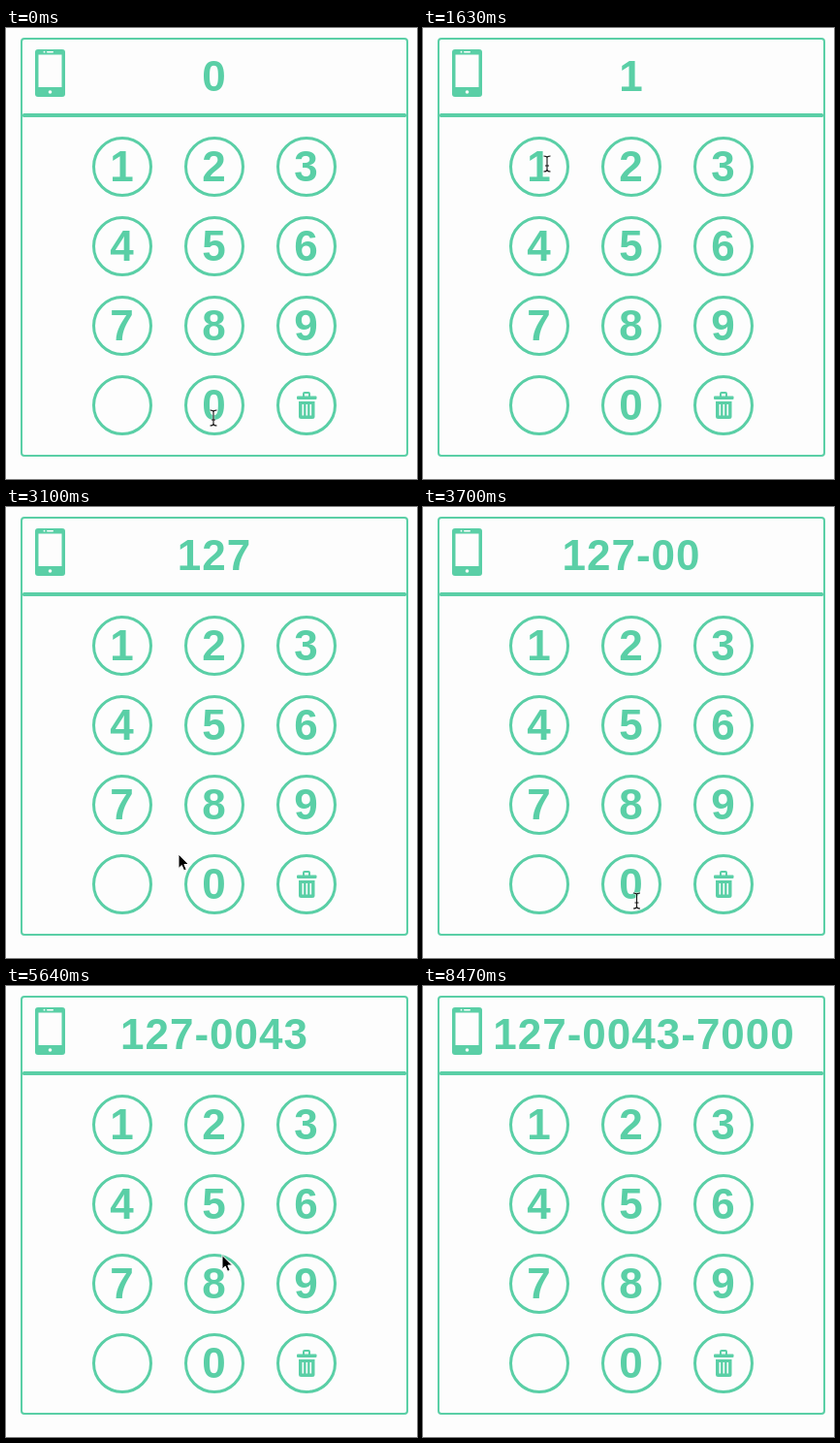
These frames come from a looping animation (424 by 465 pixels, 9.05 s). An HTML page:

```html
<!DOCTYPE html>
<html lang="en">
<head>
<meta charset="utf-8">
<title>Phone keypad</title>
<style>
  html, body { margin: 0; width: 100%; height: 100%; overflow: hidden; background: #fdfdfd; }
  svg { display: block; width: 424px; height: 465px; }
  text {
    font: bold 44px "Liberation Sans", Arial, sans-serif;
    letter-spacing: 1px;
    fill: #5acfa6;
    text-anchor: middle;
  }
  #number.full { text-anchor: start; }
  #number.hint { fill: #e0f4ed; }
  .ink { fill: #5acfa6; }
  .line { fill: none; stroke: #5acfa6; }
  .paper { fill: #fdfdfd; }
</style>
</head>
<body>
<svg viewBox="0 0 424 465">
  <rect class="line" x="16" y="11" width="398" height="430" rx="3" stroke-width="2"/>
  <rect class="ink" x="17" y="88" width="396" height="4" rx="1.5"/>

  <g id="phone">
    <rect class="ink" x="30" y="22" width="31" height="49" rx="3"/>
    <rect class="paper" x="33.5" y="27.5" width="24" height="33.5"/>
    <rect class="paper" x="42" y="24" width="7" height="1.5" rx=".7"/>
    <circle class="paper" cx="39.5" cy="24.7" r=".9"/>
    <circle class="paper" cx="45.5" cy="66" r="1.8"/>
  </g>

  <text id="number" y="64.5"></text>
  <g id="keys"></g>

  <g id="trash">
    <path class="line" d="M307 380v-3q0-1 1-1h4q1 0 1 1v3" stroke-width="2"/>
    <rect class="ink" x="300" y="379.5" width="20.5" height="3.5" rx="1"/>
    <path class="ink" d="M302 385h16.500v15.500q0 2.500-2.500 2.500h-11.500q-2.500 0-2.500-2.500z"/>
    <path d="M306.300 388v11.500M310.300 388v11.500M314.300 388v11.500" stroke="#fdfdfd" stroke-width="1.6"/>
  </g>

  <g id="beam" fill="none">
    <path d="M-3.500-8Q0-8 0-6V6Q0 8-3.500 8M3.500-8Q0-8 0-6M0 6Q0 8 3.500 8M-2 2H2" stroke="#fff" stroke-width="2.4" opacity=".7"/>
    <path d="M-3.500-8Q0-8 0-6V6Q0 8-3.500 8M3.500-8Q0-8 0-6M0 6Q0 8 3.500 8M-2 2H2" stroke="#111" stroke-width="1.1"/>
  </g>
  <path id="arrow" d="M0 0V14.500L3.300 11.500L5.600 16.800L8.200 15.700L5.900 10.500H10.500Z" fill="#000" stroke="#fff" stroke-width="1"/>
</svg>

<script>
const LOOP = 9050;
const HINT = "000-0000-0000";

// [time, shown text]
const typed = [
  [0, "0"], [440, HINT], [1480, "1"], [2220, "12"], [2810, "127"],
  [3550, "127-0"], [3700, "127-00"], [4600, "127-004"], [5040, "127-0043"],
  [6090, "127-0043-7"], [6540, "127-0043-70"],
  [6980, "127-0043-700"], [7130, "127-0043-7000"]
];

// [time, pointer shape, x, y]
const moves = [
  [0, "beam", 214, 402],
  [150, "arrow", 262, 399],
  [290, "arrow", 307, 395],
  [740, "arrow", 290, 360],
  [890, "arrow", 228, 262],
  [1040, "arrow", 160, 168],
  [1190, "beam", 125.5, 134],
  [1330, "beam", 128, 140],
  [1780, "beam", 136, 141],
  [1920, "arrow", 177, 142],
  [2070, "beam", 220, 143],
  [2360, "beam", 203.5, 292],
  [2510, "arrow", 155, 300],
  [2660, "beam", 136, 306],
  [3100, "arrow", 178, 358],
  [3250, "beam", 220.5, 406],
  [4150, "arrow", 192, 345],
  [4300, "arrow", 150, 258],
  [4450, "beam", 130, 230],
  [4740, "arrow", 245, 176],
  [4890, "beam", 325, 142],
  [5340, "arrow", 337, 140],
  [5640, "arrow", 223, 277.5],
  [5790, "arrow", 160, 296],
  [5940, "beam", 130, 308],
  [6390, "beam", 219.5, 405],
  [8320, "arrow", 355, 449],
  [8470, "none", 0, 0]
];

const $ = id => document.getElementById(id);
const number = $("number");

function add(tag, attrs, label = "") {
  const el = document.createElementNS("http://www.w3.org/2000/svg", tag);
  for (const k in attrs) el.setAttribute(k, attrs[k]);
  el.textContent = label;
  $("keys").append(el);
}

[..."123456789 0 "].forEach((label, i) => {
  const x = 120 + (i % 3) * 95;
  const y = 143 + Math.floor(i / 3) * 82;
  add("circle", { cx: x, cy: y, r: 29.5, class: "line", "stroke-width": 3 });
  if (label !== " ") add("text", { x, y: y + 15 }, label);
});

const at = (steps, t) => steps.findLast(s => s[0] <= t);

function showText(value) {
  if (number.textContent === value) return;
  // the longest value no longer fits centred and starts at the field's left edge
  const full = value.length === HINT.length;
  number.textContent = value;
  number.setAttribute("x", full ? 72.3 : 215);
  number.classList.toggle("full", full);
  number.classList.toggle("hint", value === HINT);
}

function showPointer([, shape, x, y]) {
  for (const id of ["beam", "arrow"]) {
    $(id).style.display = id === shape ? "" : "none";
    $(id).setAttribute("transform", `translate(${x} ${y})`);
  }
}

let start;
function draw(now) {
  start ??= now;
  const t = (now - start) % LOOP;
  showText(at(typed, t)[1]);
  showPointer(at(moves, t));
  requestAnimationFrame(draw);
}
requestAnimationFrame(draw);
</script>
</body>
</html>
```
